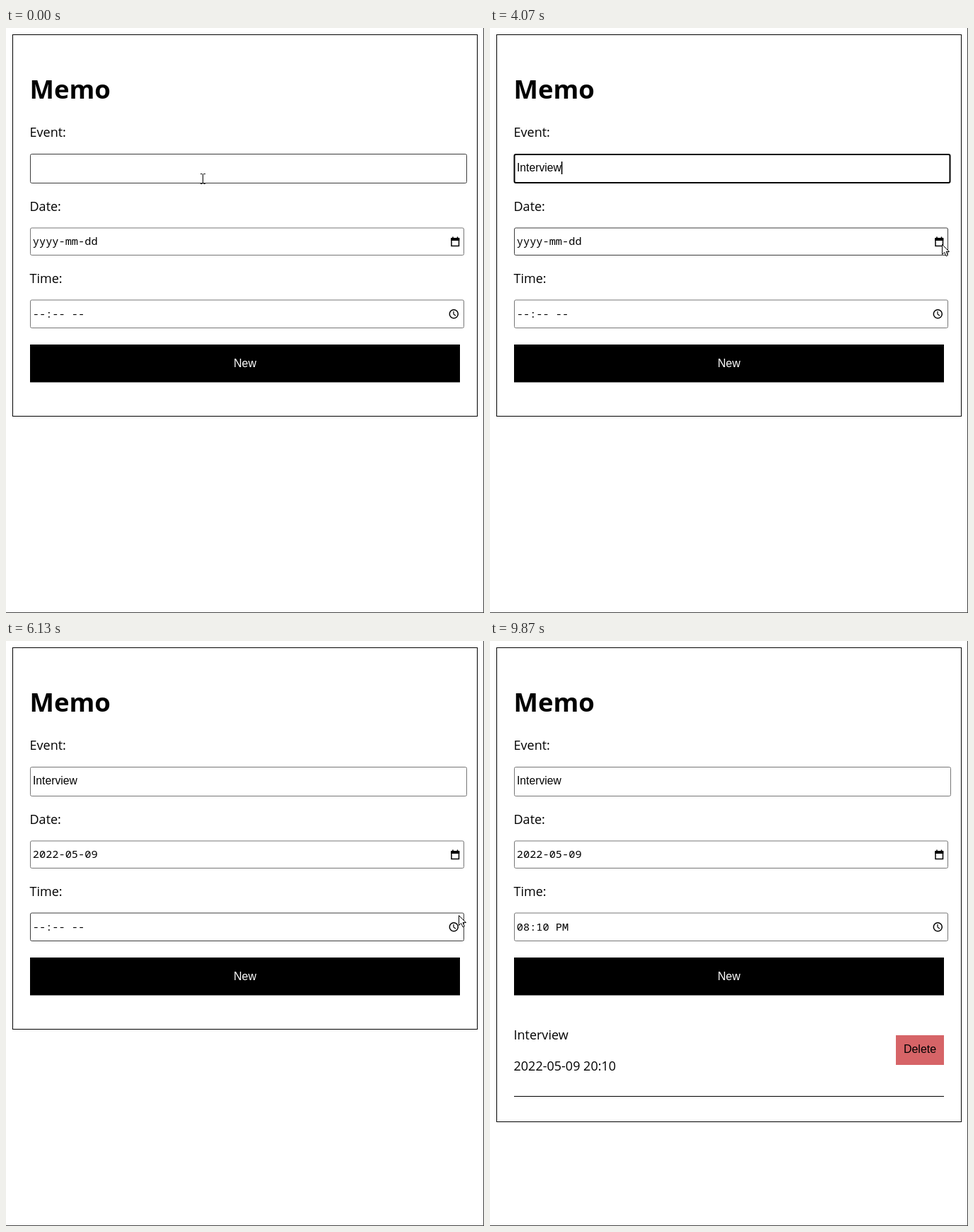
These frames come from a looping animation (676 px wide and 828 px high, 9990 ms). An HTML page:

```html
<!DOCTYPE html>
<html lang="en">
<head>
<meta charset="utf-8">
<title>Memo</title>
<style>
  html, body { margin: 0; width: 100%; height: 100%; overflow: hidden; background: #fff; }
  svg { display: block; }
  text { white-space: pre; }
  .label { font: 18px "Open Sans", sans-serif; }
  .title { font: 700 36.5px "Open Sans", sans-serif; }
  .ui { font: 16px "Liberation Sans", Arial, sans-serif; }
  .value { font: 15.7px "Liberation Sans", Arial, sans-serif; }
  .cal { font: 14px "Liberation Sans", Arial, sans-serif; }
  .mono { font: 15.3px "Noto Sans Mono", monospace; }
  .bold { font-weight: 700; }
  .mid { text-anchor: middle; }
  .popup { filter: drop-shadow(0 1px 3px rgba(0, 0, 0, .4)); }
</style>
</head>
<body>
<svg id="stage" width="676" height="828" viewBox="0 0 676 828"></svg>
<script>
const stage = document.getElementById('stage');
const LOOP = 9990, BLUE = '#0075ff', MARK = '#0078d7';

const FOCUS = 4, DATE_OPEN = 64, DATE_SET = 84, TIME_OPEN = 98, TIME_SET = 104,
      MINUTE_PICK = 112, TIME_CLOSE = 125, ADDED = 127;
const WORD = 'Interview', KEYS = [15, 19, 21, 22, 24, 32, 36, 39, 41];

// Pointer path: tick, x, y
const PATH = [
  [0, 278, 213], [2, 278, 209], [4, 285, 204], [7, 296, 199], [19, 296, 199],
  [24, 297, 199], [46, 297, 199], [49, 614, 138], [52, 640, 200], [61, 639, 306],
  [64, 639, 306], [66, 588, 307], [68, 125, 339], [70, 139, 341], [76, 120, 400],
  [80, 97, 447], [82, 97, 451], [84, 97, 451], [89, 634, 350], [91, 640, 385],
  [96, 641, 402], [100, 641, 402], [104, 72, 447], [109, 72, 447], [112, 140, 452],
  [114, 142, 453], [118, 300, 450], [120, 383, 470], [123, 342, 481],
  [129, 342, 481], [131, 342, 479]
];
const EXIT = [[140, 12, 793], [144, 22, 816]];

const text = (x, y, s, cls, fill = '#000') =>
  `<text x="${x}" y="${y}" class="${cls}" fill="${fill}">${s}</text>`;
const rect = (x, y, w, h, fill, extra = '') =>
  `<rect x="${x}" y="${y}" width="${w}" height="${h}" fill="${fill}" ${extra}/>`;
const line = (d, width = 1, color = '#000') =>
  `<path d="${d}" fill="none" stroke="${color}" stroke-width="${width}"/>`;

function at(path, k) {
  let i = 0;
  while (i < path.length - 2 && path[i + 1][0] <= k) i++;
  const [a, ax, ay] = path[i], [b, bx, by] = path[i + 1];
  const u = Math.min(1, (k - a) / (b - a));
  return [ax + (bx - ax) * u, ay + (by - ay) * u];
}

function pointer(k) {
  if (k < 132) return at(PATH, k);
  return k >= 140 && k < 145 ? at(EXIT, k) : null;
}

function field(y, w, h, p, focused) {
  const hover = p && p[0] > 34 && p[0] < 34 + w && p[1] > y && p[1] < y + h;
  return rect(34.5, y + .5, w - 1, h - 1, '#fff',
    `rx="2" stroke="${hover || focused ? '#3c3c3c' : '#767676'}"`);
}

function eventField(k, p) {
  const focused = k >= FOCUS && k < DATE_OPEN;
  let out = focused
    ? rect(34.5, 179, 616, 40, '#fff', 'rx="2" stroke="#000" stroke-width="2"')
    : field(178, 618, 42, p, false);
  const typed = KEYS.filter(t => t <= k);
  out += `<text id="typed" x="38" y="203" class="value">${WORD.slice(0, typed.length)}</text>`;
  const last = typed.length ? typed[typed.length - 1] : FOCUS;
  if (focused && Math.floor((k - last) / 8) % 2 === 0)
    out += rect(38, 189, 1.6, 18, '#000', 'id="caret"');
  return out;
}

function segments(y, value, marked) {
  let out = text(37.8, y + 5, value, 'mono');
  if (marked) {
    const w = marked * 9.18;
    out += rect(37.5, y - 10, w, 20.5, MARK) + text(37.8, y + 5, value.slice(0, marked), 'mono', '#fff');
  }
  return out;
}

function calendar() {
  let out = `<g class="popup">${rect(35.5, 322.5, 253.5, 327, '#fff', 'stroke="#bbb"')}</g>`;
  out += text(47.5, 354, 'May, 2022', 'cal bold') + '<path d="M117 347h9l-4.5 4.5z"/>';
  out += line('M222.5 359V341M214 349.5l8.5-8.5 8.5 8.5M260 341v18M251.500 350.500l8.500 8.500 8.500-8.500', 1.3);
  const col = i => 64 + 32.7 * i;
  'Su Mo Tu We Th Fr Sa'.split(' ').forEach((d, i) => out += text(col(i), 398, d, 'cal mid'));
  out += rect(81, 443, 31, 31, BLUE, 'rx="2" stroke="#000" stroke-width="2"');
  for (let i = 0; i < 42; i++) {
    const color = i === 8 ? '#fff' : i < 31 ? '#000' : '#767676';
    out += text(col(i % 7), 430.4 + 32.75 * Math.floor(i / 7), i % 31 + 1,
      i === 8 ? 'cal mid bold' : 'cal mid', color);
  }
  return out + text(60, 631, 'Clear', 'cal', '#0a6fcb') + text(226, 631, 'Today', 'cal', '#0a6fcb');
}

function clockList(k) {
  let out = `<g class="popup">${rect(35.5, 425.5, 200, 303, '#fff', 'stroke="#bbb"')}</g>`;
  const ring = k < MINUTE_PICK ? 0 : 1;
  const pad = n => String(n).padStart(2, '0');
  for (let c = 0; c < 3; c++) {
    const x = 39.3 + 65.4 * c;
    out += rect(x, 429.5, 61, 42, BLUE, 'rx="2"');
    if (c === ring) out += rect(x + 1, 430.5, 59, 40, BLUE, 'rx="2" stroke="#000" stroke-width="2"');
    for (let r = 0; r < (c < 2 ? 7 : 2); r++) {
      const s = [pad((7 + r) % 12 + 1), 10 + r, r ? 'AM' : 'PM'][c];
      out += text(x + 30.5, 456.6 + 42.1 * r, s, r ? 'ui mid' : 'ui mid bold', r ? '#000' : '#fff');
    }
  }
  return out;
}

function icons() {
  return line('M630 298.5h10.500v10h-10.500z', 1.5) + rect(629.3, 297, 12, 4, '#000') +
    line('M632 295.500v2M638.500 295.500v2', 1.6) +
    '<circle cx="633.3" cy="404.800" r="6" fill="none" stroke="#000" stroke-width="1.5"/>' +
    line('M633 401v4l3 2.200', 1.2);
}

function entry() {
  return text(33.5, 564, WORD, 'label') + text(33.5, 608, '2022-05-09 20:10', 'label') +
    rect(574, 558, 68, 42, '#d66467') + text(608, 583, 'Delete', 'ui mid') +
    line('M34 644.5H642');
}

function cursor(p) {
  if (!p) return '';
  const [x, y] = p.map(Math.round);
  const beam = x > 34 && x < 651 && y > 178 && y < 220;
  const shape = beam
    ? line('M-3 -6.500h2.500l1 1 1-1h2.500M-3 7.500h2.500l1-1 1 1h2.500M.5 -6v13')
    : '<path d="M.5 .5v14l3.200-3 2.300 5.300 2.400-1-2.300-5.200h4.400z" fill="#fff" stroke="#000"/>';
  return `<g transform="translate(${x} ${y})">${shape}</g>`;
}

function draw(k) {
  const p = pointer(k);
  const dateOpen = k >= DATE_OPEN && k < DATE_SET;
  const timeOpen = k >= TIME_OPEN && k < TIME_CLOSE;
  const added = k >= ADDED;
  stage.innerHTML =
    line('M675.5 0V828M0 827.500H676', 1, '#444') +
    rect(9.5, 9.5, 657, added ? 671 : 540, '#fff', 'stroke="#000"') +
    text(33.5, 100, 'Memo', 'title') +
    text(33.5, 154, 'Event:', 'label') + eventField(k, p) +
    text(33.5, 259, 'Date:', 'label') + field(282.5, 614, 39.5, p, dateOpen) +
    segments(302, k < DATE_SET ? 'yyyy-mm-dd' : '2022-05-09', dateOpen ? 4 : 0) +
    text(33.5, 361, 'Time:', 'label') + field(384.5, 614, 40.5, p, false) +
    segments(405, k < TIME_SET ? '--:-- --' : '08:10 PM', timeOpen ? 2 : 0) +
    icons() + rect(34, 448, 608, 53.5, '#000') + text(338, 480, 'New', 'ui mid', '#fff') +
    (added ? entry() : '') + (dateOpen ? calendar() : '') + (timeOpen ? clockList(k) : '') +
    cursor(p);
  const caret = document.getElementById('caret');
  if (caret) caret.setAttribute('x', 38 + document.getElementById('typed').getComputedTextLength());
}

let shown = -1;
function frame() {
  const k = Math.floor((performance.now() % LOOP + 4) * .015);
  if (k !== shown) draw(shown = k);
  requestAnimationFrame(frame);
}
frame();
</script>
</body>
</html>
```
